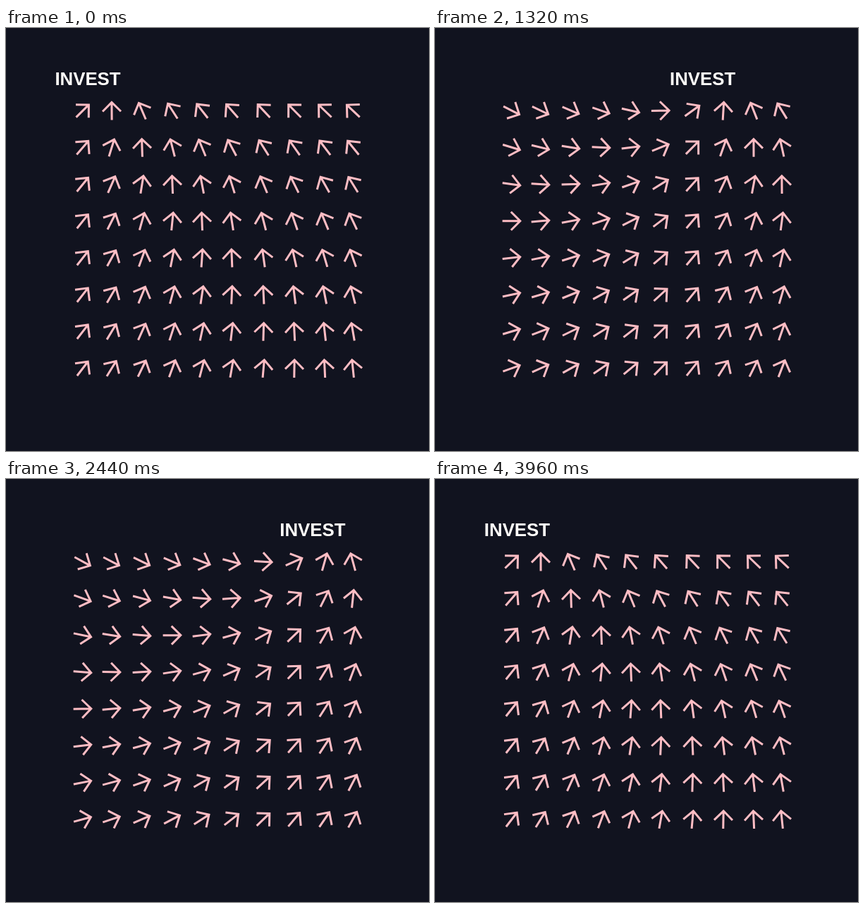
These frames come from a looping animation (600 by 600 pixels, 4000 ms). An HTML page with a canvas:

```html
<!DOCTYPE html>
<html lang="en">
<head>
<meta charset="utf-8">
<title>Arrows following a word</title>
<style>
  html, body { margin: 0; width: 100%; height: 100%; overflow: hidden; background: #11131f; }
  canvas { display: block; width: 600px; height: 600px; }
</style>
</head>
<body>
<canvas id="stage" width="600" height="600"></canvas>
<script>
const ctx = document.getElementById('stage').getContext('2d');
const LOOP = 4000, STEP = 40;
const COLUMNS = [109, 150, 193, 236, 278, 320.3, 365.3, 409, 452, 492];
const ROWS = 8, FIRST_ROW = 117.2, ROW_GAP = 52.2;
const WORD_Y = 72, WORD_START = 116, WORD_TRAVEL = 362;
const TURN = 36.5 * Math.PI / 180; // every arrow leans clockwise from the word

// Smoothstep with a slightly slower departure than arrival
function ease(p) {
  const s = p - 0.035 * p * (1 - p) ** 2;
  return s * s * (3 - 2 * s);
}

function wordX(time) {
  const leg = time / (LOOP / 2);
  const progress = leg < 1 ? ease(leg) : 1 - ease(leg - 1);
  return WORD_START + WORD_TRAVEL * progress;
}

function drawArrow(x, y, angle) {
  ctx.save();
  ctx.translate(x, y);
  ctx.rotate(angle);
  ctx.beginPath();
  ctx.moveTo(-13.4, 0);
  ctx.lineTo(11.8, 0);
  ctx.moveTo(-1.2, -13);
  ctx.lineTo(11.8, 0);
  ctx.lineTo(-1.2, 13);
  ctx.stroke();
  ctx.restore();
}

function draw(time) {
  const targetX = wordX(time);
  ctx.fillStyle = '#11131f';
  ctx.fillRect(0, 0, 600, 600);

  ctx.fillStyle = '#fffdfa';
  ctx.font = 'bold 25.8px "Liberation Sans", Arial, sans-serif';
  ctx.textAlign = 'center';
  ctx.fillText('INVEST', targetX, 80.7);

  ctx.strokeStyle = '#ffbdc4';
  ctx.lineWidth = 3;
  for (let row = 0; row < ROWS; row++) {
    const y = FIRST_ROW + row * ROW_GAP;
    for (const x of COLUMNS) {
      drawArrow(x, y, Math.atan2(WORD_Y - y, targetX - x) + TURN);
    }
  }
}

function tick() {
  const time = performance.now() % LOOP;
  draw(Math.floor(time / STEP) * STEP);
  requestAnimationFrame(tick);
}
tick();
</script>
</body>
</html>
```
